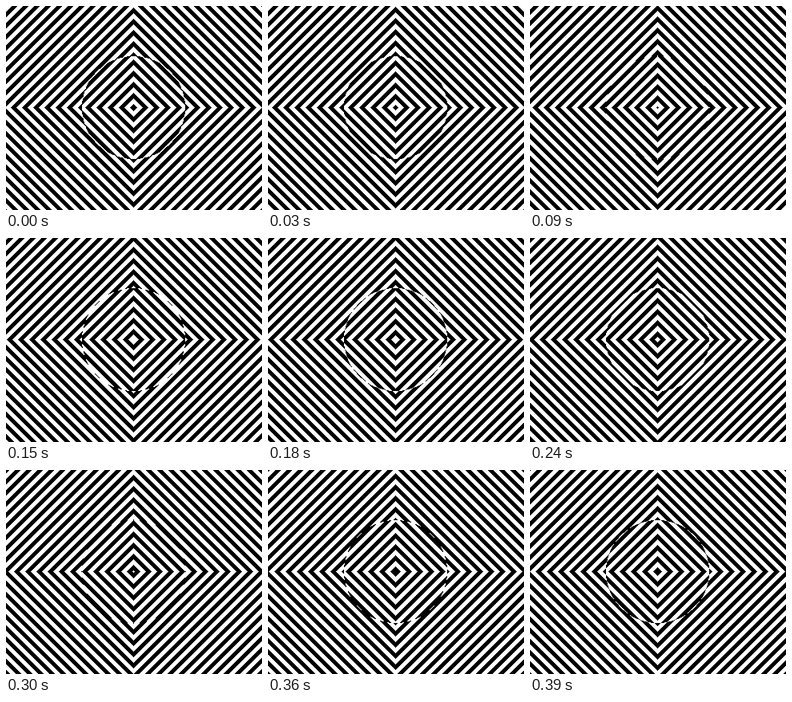
Recreate the animation shown at these times as an HTML page with a canvas. Size 320 by 256 pixels, loop 0.42 s.

```html
<!DOCTYPE html>
<html lang="en">
<head>
<meta charset="utf-8">
<title>Diamond stripes</title>
<style>
  html, body { margin: 0; width: 100%; height: 100%; overflow: hidden; background: #fff; }
  canvas { display: block; width: 320px; height: 256px; image-rendering: pixelated; }
</style>
</head>
<body>
<canvas id="stage" width="320" height="256"></canvas>
<script>
const W = 320, H = 256, CX = 159, CY = 127, RADIUS = 64.5;
const PERIOD = 14, STEP_MS = 30;
const BLACK = 0xff000000, WHITE = 0xffffffff;
const ctx = document.getElementById('stage').getContext('2d');
const image = ctx.createImageData(W, H);
const pixels = new Uint32Array(image.data.buffer);
const mod = n => ((n % PERIOD) + PERIOD) % PERIOD;

function draw(step) {
  for (let y = 0, i = 0; y < H; y++) {
    for (let x = 0; x < W; x++, i++) {
      const dx = Math.abs(x - CX), dy = Math.abs(y - CY);
      const d = dx + dy;
      // Stripes shrink inside the disc and grow outside it.
      const phase = Math.hypot(dx, dy) < RADIUS ? d + 2 + step : d + 7 - step;
      pixels[i] = mod(phase) < PERIOD / 2 ? BLACK : WHITE;
    }
  }
  ctx.putImageData(image, 0, 0);
}

let last = -1;
function tick() {
  const step = Math.floor(performance.now() / STEP_MS) % PERIOD;
  if (step !== last) draw(last = step);
  requestAnimationFrame(tick);
}
tick();
</script>
</body>
</html>
```
